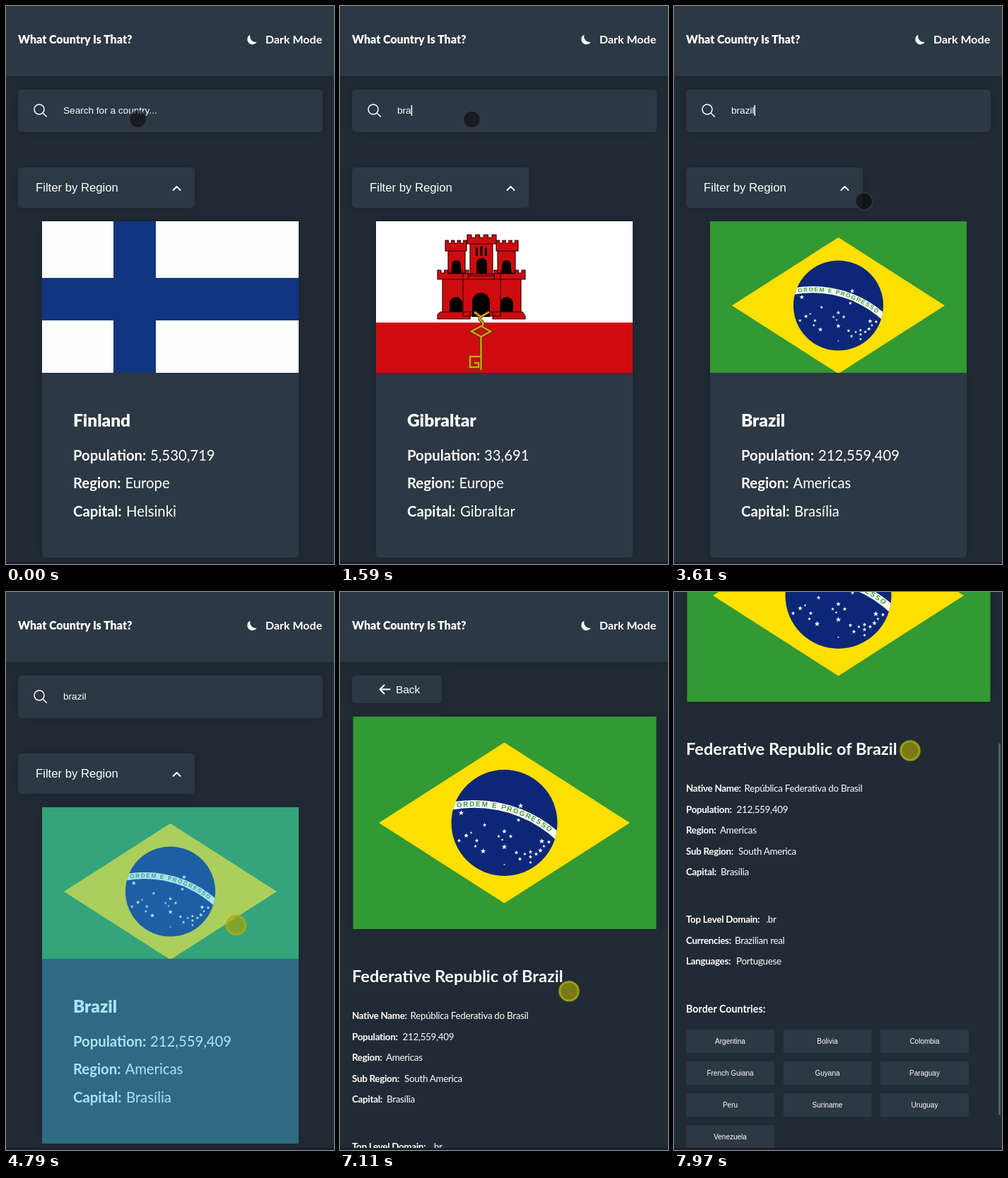
An HTML page for the animation above (8000 ms loop, 464x788 px).

```html
<!DOCTYPE html>
<html lang="en">
<head>
<meta charset="utf-8">
<title>Countries</title>
<style>
  html, body { margin: 0; width: 100%; height: 100%; overflow: hidden; background: #212b35; }
  svg { display: block; width: 100vw; height: 100vh; }
  text { fill: #fff; font-family: Lato, sans-serif; white-space: pre; }
  .ui { font-family: "Liberation Sans", Arial, sans-serif; }
  .b { font-weight: 700; }
  .x { font-weight: 900; }
  .fact { font-size: 20.3px; }
  .row { font-size: 13.4px; letter-spacing: -.3px; }
  .panel { fill: #2c3843; }
  .lift { filter: drop-shadow(0 0 7px rgba(0, 0, 0, .17)); }
  .line { fill: none; stroke: #fff; stroke-linecap: round; stroke-linejoin: round; }
</style>
</head>
<body>
<svg id="stage" viewBox="0 0 464 788" preserveAspectRatio="none"></svg>
<script>
const LOOP = 8000;
const PAGE = '#212b35';

const rect = (x, y, w, h, attrs = '') =>
  `<rect x="${x}" y="${y}" width="${w}" height="${h}" ${attrs}/>`;
const text = (x, y, str, cls, size, attrs = '') =>
  `<text x="${x}" y="${y}" class="${cls}" ${size ? `font-size="${size}"` : ''} ${attrs}>${str}</text>`;
const path = (d, attrs = '') => `<path d="${d}" ${attrs}/>`;
const pair = (y, label, x2, value, cls, x = 95) =>
  text(x, y, label + ':', cls + ' b') + text(x2, y, value, cls);

// Brazil, centred on 0,0 at 428 x 300
const STARS = [
  [23, -24, 4], [20, -4, 3], [-61, -14, 4], [-28, 3, 3], [-47, 14, 2], [-54, 18, 3.5],
  [-64, 25, 3], [-39, 25, 3], [-41, 33, 2.5], [-30, 40, 4], [0, 12, 3.5], [-8, 19, 2.5],
  [9, 19, 3], [-3, 24, 2], [0, 34, 4], [0, 59, 1.5], [17, 42, 3], [22, 51, 3], [29, 44, 2.5],
  [37, 41, 3], [37, 48, 3], [37, 56, 2.5], [45, 44, 3], [51, 39, 3.5], [56, 33, 2.5],
  [53, 26, 4], [63, 27, 3]
];

function star([x, y, r]) {
  let d = '';
  for (let i = 0; i < 10; i++) {
    const a = i * Math.PI / 5, k = i % 2 ? r * .4 : r;
    d += `${i ? 'L' : 'M'}${(x + k * Math.sin(a)).toFixed(2)} ${(y - k * Math.cos(a)).toFixed(2)}`;
  }
  return d + 'z';
}

const brazil = rect(-214, -150, 429, 300, 'fill="#339933"') +
  path('M-177.5 0L0-113.5 177.5 0 0 113.5z', 'fill="#fddf00"') +
  '<circle r="75" fill="#0d2778"/>' +
  '<circle cx="-42.9" cy="150" r="176.7" fill="none" stroke="#fff" stroke-width="10.7" clip-path="url(#globe)"/>' +
  `<text class="ui b" font-size="9.8" letter-spacing="1.75" style="fill:#339933">
    <textPath href="#motto">ORDEM E PROGRESSO</textPath></text>` +
  path(STARS.map(star).join(''), 'fill="#fff"');

const finland = rect(51, 304, 363, 214, 'fill="#fdfdfd"') +
  path('M152 304h60v80h202v60H212v74H152V444H51V384H152z', 'fill="#12357f"');

// Gibraltar's castle and key
function crown(x, y, w, h, n) {
  const u = w / (2 * n - 1);
  let d = `M${x} ${y}`;
  for (let i = 0; i < n; i++) d += `h${u}` + (i < n - 1 ? `v4h${u}v-4` : '');
  return d + `v${h}H${x}z`;
}
const arch = (x, y, w, h) => `M${x} ${y + h}v${w / 2 - h}a${w / 2} ${w / 2} 0 0 1 ${w} 0v${h - w / 2}z`;
const block = (x, y, w, h) => `M${x} ${y}h${w}v${h}h${-w}z`;

const gibraltar = rect(51, 304, 363, 214, 'fill="#fff"') + rect(51, 447, 363, 71, 'fill="#ce0c10"') +
  path(block(153, 346, 24, 32) + block(223, 346, 25, 32) + block(184, 336, 32, 45) +
    crown(149, 331, 30, 15, 4) + crown(221, 331, 31, 15, 4) + crown(180, 323, 41, 13, 4) +
    crown(138, 373, 44, 13, 5) + crown(218, 373, 44, 13, 5) +
    block(145, 386, 111, 46) + block(174, 378, 53, 60) +
    'M142 432h42v10H138v-6zM216 432h42l4 6v4H216z',
    'fill="#ce0c10" stroke="#2b0505" stroke-width="1.2"') +
  path(arch(187, 405, 25, 34) + arch(155, 411, 18, 21) + arch(227, 411, 18, 21) +
    arch(193, 356, 15, 22) + arch(158, 359, 13, 19) + arch(229, 359, 13, 19) +
    arch(192, 341, 3, 12) + arch(198.5, 339, 3, 14) + arch(205, 341, 3, 12)) +
  ['#4a3305', '#d9a510'].map((c, i) =>
    path('M190 432l9 7 12-7M200 438q-5 4 0 7t0 8M186 459.500l13.500-7.500 13.500 7.500-13.500 7.500zM199.500 467v47M199 495h-15v15h12v-6h-6',
      `fill="none" stroke="${c}" stroke-width="${i ? 2.4 : 4.2}"`)).join('');

const card = (id, name, pop, region, capital, flag) =>
  `<g id="${id}">` + rect(51, 304, 363, 475, 'rx="5" class="panel lift"') + flag +
  text(95, 594, name, 'x', 24.4) +
  pair(642, 'Population', 204, pop, 'fact') +
  pair(681, 'Region', 168.5, region, 'fact') +
  pair(721, 'Capital', 170, capital, 'fact') + '</g>';

const header = rect(0, 0, 464, 99, 'class="panel lift"') +
  text(17, 53, 'What Country Is That?', 'x', 16) + text(367, 53, 'Dark Mode', 'b', 16) +
  path('M345.500 40.500a7.300 7.300 0 1 0 9.300 10.500a8.300 8.300 0 0 1-9.300-10.500z', 'fill="#fff"');

const list = rect(17, 118, 431, 60, 'rx="5" class="panel lift"') +
  path('M54 146a7 7 0 1 0-14 0a7 7 0 1 0 14 0M52.300 151.300l5 5', 'class="line" stroke-width="1.5"') +
  text(81, 152, '', 'ui', 13.6, 'id="query"') +
  rect(0, 140, 1.5, 15, 'id="caret" fill="#fff"') +
  rect(17, 228, 250, 57, 'rx="5" class="panel lift"') +
  text(42, 262, 'Filter by Region', 'ui', 16.7) +
  path('M236.500 260l5-5 5 5', 'class="line" stroke-width="2"') +
  card('finland', 'Finland', '5,530,719', 'Europe', 'Helsinki', finland) +
  card('gibraltar', 'Gibraltar', '33,691', 'Europe', 'Gibraltar', gibraltar) +
  card('brazil', 'Brazil', '212,559,409', 'Americas', 'Brasília',
    `<g clip-path="url(#crop)"><g transform="translate(232.5 423) scale(.848)">${brazil}</g></g>`) +
  rect(51, 304, 363, 475, 'id="tap" fill="rgba(51,181,229,.4)"');

const neighbours = ['Argentina', 'Bolivia', 'Colombia', 'French Guiana', 'Guyana',
  'Paraguay', 'Peru', 'Suriname', 'Uruguay', 'Venezuela'].map((name, i) => {
  const x = 17 + i % 3 * 137.5, y = 939 + 45 * Math.floor(i / 3);
  return rect(x, y, 125, 33, 'rx="2" class="panel"') +
    text(x + 62.5, y + 20, name, 'ui', 10, 'text-anchor="middle"');
}).join('');

const rows = [
  [603, 'Native Name', 99.5, 'República Federativa do Brasil'],
  [633, 'Population', 88.5, '212,559,409'],
  [662, 'Region', 65, 'Americas'],
  [692, 'Sub Region', 91, 'South America'],
  [721, 'Capital', 66, 'Brasília'],
  [788, 'Top Level Domain', 130, '.br'],
  [818, 'Currencies', 86, 'Brazilian real'],
  [847, 'Languages', 88, 'Portuguese']
].map(r => pair(...r, 'row', 17)).join('');

const detail = rect(17, 118, 127, 39, 'rx="5" class="panel lift"') +
  path('M70.500 137.500H56.500M62.500 131.500l-6 6 6 6', 'class="line" stroke-width="2"') +
  text(79, 143, 'Back', 'ui', 15.4) +
  `<g class="lift" transform="translate(232.5 326)">${brazil}</g>` +
  text(17, 551, 'Federative Republic of Brazil', 'b', 23.6) + rows +
  text(17, 915, 'Border Countries:', 'b', 14.3) + neighbours;

document.getElementById('stage').innerHTML = `<defs>
  <clipPath id="globe"><circle r="75"/></clipPath>
  <clipPath id="crop">${rect(51, 304, 363, 214)}</clipPath>
  <path id="motto" d="M-67.300-21.600A173.300 173.300 0 0 1 83 30"/></defs>` +
  rect(0, 0, 464, 788, `fill="${PAGE}"`) +
  `<g id="page"><g id="list">${list}</g><g id="detail">${detail}</g>${header}</g>` +
  path('M0 0L-53-53A75 75 0 0 1 53-53zM0 0L53 53A75 75 0 0 1-53 53z', 'id="loader" fill="#5a6268"') +
  rect(459, 0, 3, 525, 'id="bar" rx="1" fill="#545d65"') +
  rect(0, 785, 464, 3, 'fill="#1b202d"') +
  '<circle id="dot"/>';

const el = {};
document.querySelectorAll('#stage [id]').forEach(n => el[n.id] = n);
const show = (node, on) => node.setAttribute('visibility', on ? 'inherit' : 'hidden');
const within = (t, spans) => spans.find(([a, b]) => t >= a && t < b);

// time, pointer x, pointer y, scroll
const MOVES = [
  [0, 186.5, 160, 0], [3210, 186.5, 160, 0], [3400, 206, 186, 0], [3750, 310, 335, 0],
  [4010, 353, 397, 0], [4080, 350, 412, 0], [4280, 325.5, 470.5, 0], [6340, 325.5, 470.5, 0],
  [6650, 324, 564, 0], [7110, 324, 564, 0], [7180, 326, 549, 0], [7300, 331, 464, 85],
  [7450, 336, 357, 192], [7510, 336, 325, 224], [7580, 336, 311, 238], [7790, 336, 311, 238],
  [7840, 335.5, 293, 254], [7970, 334, 224, 321], [8000, 334, 224, 321]
];
const KEYS = [[1000, 'b'], [1200, 'br'], [1390, 'bra'], [1810, 'braz'], [2010, 'brazi'], [2280, 'brazil']];
const CARET = [[340, 810], [1000, 2740], [3270, 3740], [4210, 4660]];
const PRESS = [[70, 340], [4600, 5120], [7110, LOOP]];
const LOADING = [[1000, 1590], [1810, 2140], [2280, 2410], [5120, 5330]];
const QUERY_W = { f: .278, b: .556, r: .333, a: .556, z: .5, i: .222, l: .222 };

function track(t) {
  const i = Math.max(1, MOVES.findIndex(m => m[0] > t));
  const a = MOVES[i - 1], b = MOVES[i], k = (t - a[0]) / (b[0] - a[0]);
  return a.map((v, j) => v + (b[j] - v) * k);
}

function draw(t) {
  const [, x, y, scroll] = track(t);
  const typed = KEYS.reduce((s, [at, word]) => t >= at ? word : s, '');
  const loading = within(t, LOADING);

  el.query.textContent = typed || 'Search for a country...';
  el.caret.setAttribute('x', 81 + 13.6 * [...typed].reduce((w, c) => w + QUERY_W[c], 0));
  show(el.caret, within(t, CARET));
  show(el.list, t < 5120);
  show(el.finland, t < 1000);
  show(el.gibraltar, t >= 1590 && t < 1810);
  show(el.brazil, t >= 2140 && !loading);
  show(el.tap, t >= 4780);

  show(el.loader, loading);
  if (loading) el.loader.setAttribute('transform',
    `translate(233 542) rotate(${5.4 + .36 * (t - loading[0])})`);

  const enter = Math.min(1, Math.max(0, (t - 5330) / 390));
  const left = (1 - enter) ** 3;
  show(el.detail, t >= 5330);
  el.detail.setAttribute('transform', `translate(${-100 * left} 0)`);
  el.detail.setAttribute('opacity', 1 - left);

  el.page.setAttribute('transform', `translate(0 ${-scroll})`);
  show(el.bar, scroll > 0);
  el.bar.setAttribute('y', scroll * .666);

  const down = within(t, PRESS);
  const look = down
    ? { r: 13.3, fill: 'rgba(170,165,5,.65)', stroke: 'rgba(172,172,22,.8)', 'stroke-width': 3 }
    : { r: 12, fill: 'rgba(0,0,0,.5)', stroke: 'rgba(62,64,72,.6)', 'stroke-width': 2 };
  Object.entries({ cx: x, cy: y, ...look }).forEach(([k, v]) => el.dot.setAttribute(k, v));
}

const start = performance.now();
function tick() {
  draw((performance.now() - start) % LOOP);
  requestAnimationFrame(tick);
}
tick();
</script>
</body>
</html>
```
